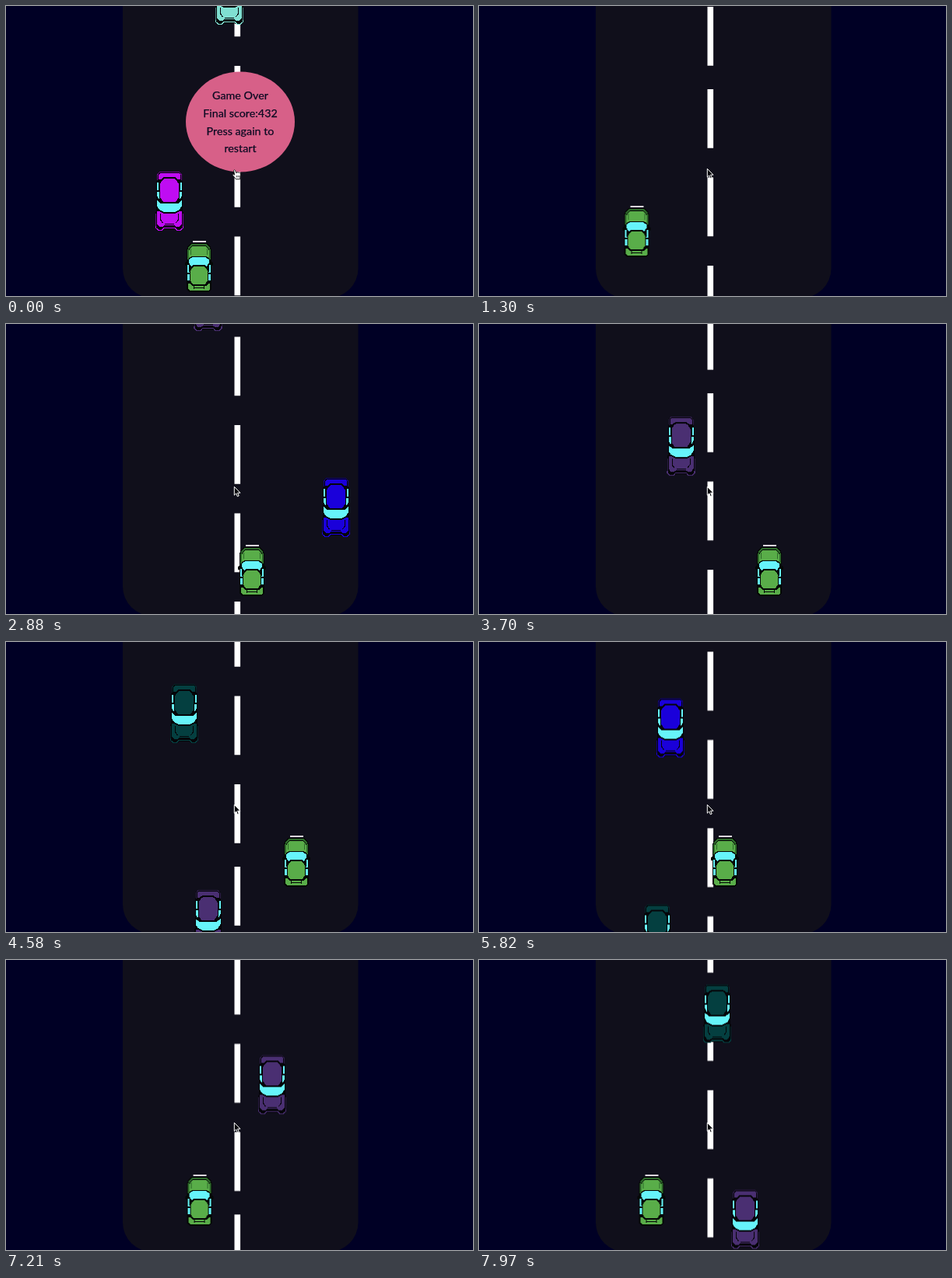
An HTML page that plays this animation: 600 by 373 pixels, repeating every 8000 ms.

```html
<!DOCTYPE html>
<html lang="en">
<head>
<meta charset="utf-8">
<title>Night drive</title>
<style>
  html, body { margin: 0; width: 100%; height: 100%; overflow: hidden; background: #000025; }
  svg { display: block; width: 100%; height: 100%; }
  .px { shape-rendering: crispEdges; }

  /* 264 pictures per loop; every steps(n) spans n of them */
  .world, .steer, .drive, .over, .arrow { animation: 8s steps(1) -4ms infinite; }
  .world { animation-name: scroll; }
  .steer { animation-name: steer; }
  .drive { animation-name: drive; }
  .over { animation-name: leave; }
  .arrow { animation-name: arrive; }

  @keyframes scroll {
    0% { transform: translateY(183px); }
    10.2273% { transform: translateY(0); animation-timing-function: steps(16); }
    16.2879% { transform: translateY(107px); animation-timing-function: steps(52); }
    35.9848% { transform: translateY(463px); animation-timing-function: steps(56); }
    57.197% { transform: translateY(849px); animation-timing-function: steps(41); }
    72.7273% { transform: translateY(1132.5px); animation-timing-function: steps(24); }
    81.8182% { transform: translateY(1295px); animation-timing-function: steps(47); }
    99.6212%, 100% { transform: translateY(1620.5px); }
  }
  @keyframes steer {
    0% { transform: translateX(248px); }
    10.2273% { transform: translateX(168px); }
    12.8788% { transform: translateX(168px); animation-timing-function: steps(5); }
    14.7727% { transform: translateX(202.5px); }
    18.5606% { transform: translateX(202.5px); animation-timing-function: steps(5); }
    20.4545% { transform: translateX(239.5px); }
    24.2424% { transform: translateX(239.5px); animation-timing-function: steps(11); }
    28.4091% { transform: translateX(316px); }
    40.9091% { transform: translateX(316px); animation-timing-function: steps(8); }
    43.9394% { transform: translateX(373px); }
    60.2273% { transform: translateX(373px); animation-timing-function: steps(8); }
    63.2576% { transform: translateX(316px); }
    75.7576% { transform: translateX(316px); animation-timing-function: steps(9); }
    79.1667% { transform: translateX(377px); }
    82.9545% { transform: translateX(377px); animation-timing-function: steps(23); }
    91.6667%, 100% { transform: translateX(221.5px); }
  }
  @keyframes drive {
    0% { transform: translateY(302px); }
    10.2273% { transform: translateY(257px); }
    30.303% { transform: translateY(257px); animation-timing-function: steps(4); }
    31.8182% { transform: translateY(284px); }
    46.2121% { transform: translateY(284px); animation-timing-function: steps(5); }
    48.1061% { transform: translateY(249px); }
    87.8788% { transform: translateY(249px); animation-timing-function: steps(4); }
    89.3939%, 100% { transform: translateY(276px); }
  }
  @keyframes leave {
    0% { visibility: visible; }
    10.2273%, 100% { visibility: hidden; }
  }
  @keyframes arrive {
    0% { visibility: hidden; }
    10.2273%, 100% { visibility: visible; }
  }

  .blue { color: #1a00da; }
  .purple { color: #4a2f72; }
  .teal { color: #043f40; }
  .magenta { color: #bf0cf2; }
  .aqua { color: #80e0d2; }
  text { font: 14.3px Lato, "Open Sans", sans-serif; fill: #0c0a22; stroke: #0c0a22; stroke-width: .25; text-anchor: middle; }
</style>
</head>
<body>
<svg viewBox="0 0 600 373" preserveAspectRatio="none">
  <defs>
    <!-- oncoming car, 38 by 76 -->
    <g id="car" class="px">
      <path fill="#050509" d="M4 2 7 0H31L34 2 35 10 36 14V50L37 54V70L34 75H27L25 74H13L11 75H4L1 70V54L2 50V14L3 10Z"/>
      <path fill="none" stroke="currentColor" stroke-opacity=".55" d="M3.5 11V4L6.500 .5H31.500L34.500 4V11M1.500 54V70M36.500 54V70"/>
      <path fill="currentColor" d="M7 2H31L33 4V10H30L26 7H12L8 10H5V4Z"/>
      <path fill="#66f4fa" d="M3 14H5V24H6V35H5L3 31ZM35 14H33V24H32V35H33L35 31Z"/>
      <path fill="#050509" d="M3 24H6V26H3ZM32 24H35V26H32Z"/>
      <path fill="currentColor" d="M10 11 13 9H25L28 11 31 16V33L27 39H11L7 33V16Z"/>
      <path fill="#66f4fa" d="M3 37 8 41H30L35 37V44L32 49 26 52H12L6 49 3 44Z"/>
      <path fill="currentColor" d="M3 51H6L12 54H26L32 51H35V67L32 71H28L25 69H13L10 71H6L3 67Z"/>
      <path fill="none" stroke="#050509" d="M7.500 54V62L10.500 66M30.500 54V62L27.500 66M13 67.500H25"/>
      <path fill="none" stroke="currentColor" stroke-width="1.300" d="M1.500 70V72.500L4.500 75.300H9.500L12 72.500H26L28.500 75.300H33.500L36.500 72.500V70"/>
    </g>
    <!-- player, centred on x, light bar at the top -->
    <g id="player" class="px">
      <rect x="-8.500" width="17" height="2" fill="#dcd6dc"/>
      <path fill="#050806" d="M-10 3H10L14 6 16 11V27L18 28V32H16V63L13 65.500H-13L-16 63V32H-18V28L-16 27V11L-14 6Z"/>
      <path fill="#2d6a2b" d="M-9 4H9L13 7 15 12V24H13V11L9 6H-9L-13 11V24H-15V12L-13 7Z"/>
      <path fill="#59ad49" d="M-8 6.500H8L12 10 13 14V22L9 20H-9L-13 22V14L-12 10Z"/>
      <path fill="none" stroke="#2d6a2b" d="M-10.500 10V18M10.500 10V18"/>
      <path fill="#66f4fa" d="M-8 21H8L13 24V28L10 33 7 31H-7L-10 33-13 28V24Z"/>
      <path fill="#66f4fa" d="M-15 31H-13V40H-12V51H-15ZM15 31H13V40H12V51H15Z"/>
      <path fill="#050806" d="M-15 41H-12V43H-15ZM12 41H15V43H12Z"/>
      <path fill="#59ad49" d="M-6 33H6L9 35 11 39V51L8 56H-8L-11 51V39L-9 35Z"/>
      <path fill="#59ad49" d="M-14 55H-12L-9 58H9L12 55H14V62L12 64H-12L-14 62Z"/>
      <path fill="none" stroke="#050806" d="M-6.500 58V62M6.500 58V62M-6 60.500H6"/>
    </g>
  </defs>

  <rect width="600" height="373" fill="#000025"/>
  <rect x="150" y="-60" width="302.500" height="435.500" rx="38" fill="#100f1b"/>

  <g class="world">
    <path d="M297.300 -1680V560" stroke="#fff" stroke-width="7.600"
          stroke-dasharray="75.7 37.800 75.700 37.800 75.700 37.800 75.700 37.800 75.700 30.300"/>
    <use href="#car" class="blue" x="405" y="-265"/>
    <use href="#car" class="purple" x="240.500" y="-530"/>
    <use href="#car" class="teal" x="210" y="-795"/>
    <use href="#car" class="blue" x="227" y="-1060"/>
    <use href="#car" class="purple" x="323" y="-1325"/>
    <use href="#car" class="teal" x="287" y="-1589.500"/>
  </g>

  <g class="over">
    <use href="#car" class="magenta" x="191" y="213"/>
    <use href="#car" class="aqua" x="268" y="-52"/>
  </g>

  <g class="steer"><g class="drive"><use href="#player"/></g></g>

  <g class="over">
    <ellipse cx="301" cy="149" rx="70" ry="64.500" fill="#d76088"/>
    <text x="301" y="120">Game Over</text>
    <text x="301" y="143">Final score:432</text>
    <text x="301" y="165.500">Press again to</text>
    <text x="301" y="188">restart</text>
    <path fill="#fff" stroke="#111" stroke-width=".9" stroke-linejoin="round"
          d="M292.500 211.500q1-1.500 2 0l1.500 3.500 .8-1.500 1.500 .7 1-.4 1.200 1.200q1.200 .3 1 2l-.7 3.500v2.200h-5.500l-4.300-5.500q.3-1.500 2-.5l.8 .6z"/>
    <path fill="none" stroke="#111" stroke-width=".7" d="M296.500 218v2.500M298.200 218v2.500M299.900 218v2.500"/>
  </g>

  <path class="arrow" fill="#08080c" stroke="#fff" stroke-width="1" stroke-linejoin="round"
        d="M293.300 209.300V220.200L295.800 217.900 297.300 221.800 299.200 221 297.600 217.200H301Z"/>
</svg>
</body>
</html>
```
